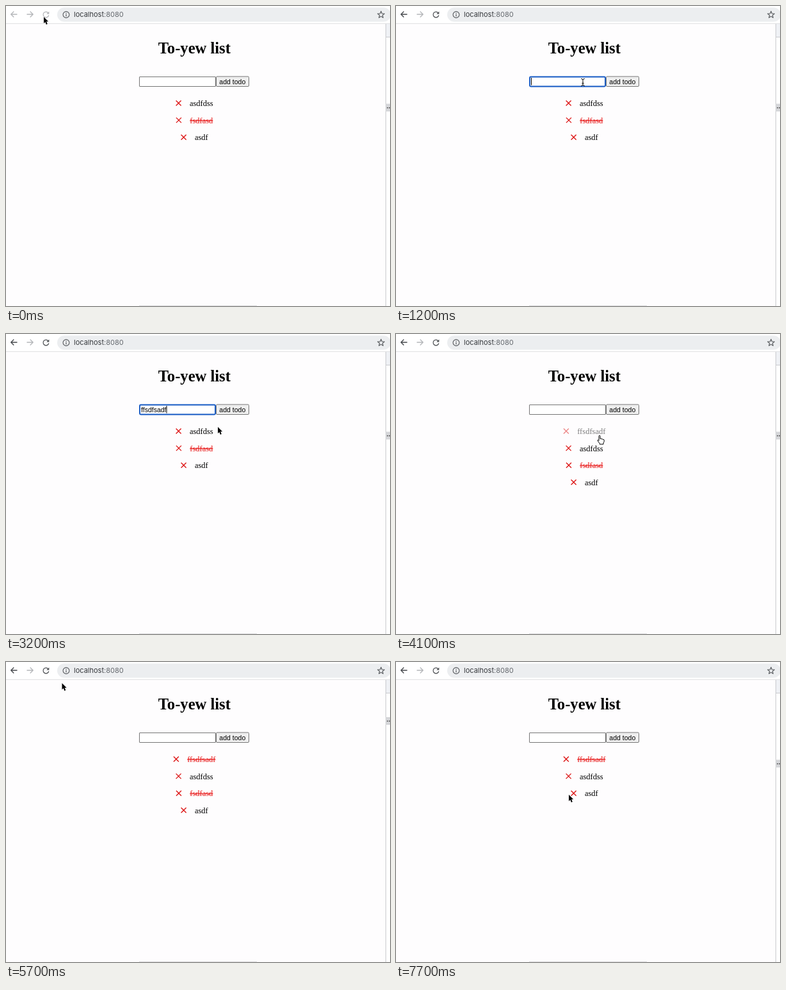
Recreate the animation shown at these times as an HTML page. Size 600 by 468 pixels, loop 8000 ms.

```html
<!DOCTYPE html>
<html lang="en">
<head>
<meta charset="utf-8">
<title>To-yew list</title>
<style>
  html, body { margin: 0; width: 100%; height: 100%; overflow: hidden; background: #fefdfe; }
  svg { display: block; width: 600px; height: 468px; }
  .line { fill: none; stroke-width: 1.3; }
  .title { font: bold 24.6px "Liberation Serif", serif; text-anchor: middle; }
  .item { font: 12.5px "Liberation Serif", serif; text-anchor: middle; }
  .done { fill: #e81818; text-decoration: line-through; }
  .control { font: 10.5px "Liberation Sans", sans-serif; }
  .address { font: 11px Inter, sans-serif; fill: #35383c; }
</style>
</head>
<body>
<svg viewBox="0 0 600 468">
  <rect width="600" height="468" fill="#fefdfe"/>

  <!-- browser toolbar -->
  <rect width="600" height="27" fill="#fff"/>
  <path d="M0 27.5H600" stroke="#e0e1e3"/>
  <rect x="80" y="2.5" width="521" height="22" rx="11" fill="#eceef0"/>
  <path id="back" class="line" d="M17.5 13H8M12.3 8.5L7.8 13L12.3 17.5"/>
  <path class="line" stroke="#b4b6b9" d="M32.5 13H42M37.7 8.5L42.2 13L37.7 17.5"/>
  <circle id="halo" cx="62.5" cy="13.5" r="11.3" fill="#e6e8eb"/>
  <g id="reload">
    <path class="line" d="M66 10.8A4.4 4.4 0 1 0 66.8 14.4"/>
    <path d="M67.4 8.4V12.6H63.2Z" stroke="none"/>
  </g>
  <circle class="line" cx="94" cy="13.5" r="4.9" stroke="#55585c" style="stroke-width:1.1"/>
  <path d="M94 12.8V16.2M94 10.7V11.9" stroke="#55585c" stroke-width="1.1"/>
  <text class="address" x="106" y="17.3">localhost<tspan fill="#65696e">:8080</tspan></text>
  <path id="star" class="line" stroke="#505357" stroke-linejoin="round" style="stroke-width:1.1"/>

  <!-- side panel edge -->
  <rect x="594" y="28" width="6" height="440" fill="#fff"/>
  <rect x="594" y="28" width="6" height="20" fill="#eff1f5"/>
  <path d="M593.5 28V468M594 48.5H600" stroke="#c9cace"/>
  <g id="handle">
    <rect x="593" y="-6" width="7" height="12" fill="#d5d6d9"/>
    <path d="M595.3 .3h1.6M598.3 .3h1.6" stroke="#444" stroke-width="1.5"/>
  </g>
  <path d="M208 467.5H392" stroke="#dedde0"/>

  <!-- page -->
  <text class="title" x="294.3" y="74">To-yew list</text>
  <rect id="field" fill="#fff"/>
  <text id="typed" class="control" x="211" y="121.5"></text>
  <path id="caret" stroke="#000"/>
  <rect id="button" x="328.5" y="110" width="51" height="15.5" rx="1.5" stroke="#767676"/>
  <text class="control" x="353.8" y="121.5" text-anchor="middle">add todo</text>
  <g id="list"></g>

  <!-- pointers, one shown at a time -->
  <g id="pointer">
    <path id="arrow" d="M0 0V10L2.3 8L3.9 11.9L5.8 11.1L4.2 7.3H7.2Z" stroke="#fff" stroke-width="1.2" paint-order="stroke"/>
    <g id="beam" fill="none">
      <path id="beamShape" stroke="#000" d="M-2.8-5.5Q-.4-5.5 0-4Q.4-5.5 2.8-5.5M0-4V4M-2.8 5.5Q-.4 5.5 0 4Q.4 5.5 2.8 5.5M-1.5 1.5H1.5"/>
    </g>
    <path id="hand" fill="#fff" stroke="#000" stroke-linejoin="round"
      d="M-1 1.4Q-1 .3 0 .3T1 1.4V5.5Q1.5 4.6 2.9 5.3L3.2 6Q4.4 5.2 5.2 6.5Q7.4 6 7.3 8.2Q7.3 10.5 6 12V14H.2V12.7L-2.8 8.7Q-3.4 7.3-2 7.4L-1 8.4Z"/>
  </g>
</svg>
<script>
const $ = id => document.getElementById(id);
const within = (t, from, to) => t >= from && t < to;
const show = (el, visible) => el.setAttribute('display', visible ? 'inline' : 'none');
const set = (el, attrs) => {
  for (const key in attrs) el.setAttribute(key, attrs[key]);
  return el;
};
const make = (tag, attrs, parent) =>
  parent.appendChild(set(document.createElementNS('http://www.w3.org/2000/svg', tag), attrs));

const LOOP = 8000, STEP = 100;
const ENTRY = 'ffsdfsadf';
const ADDED = 3800, STRUCK = 4400, REMOVED = 7300;

// pointer: time, x, y
const track = [
  [0, 59, 17], [200, 61, 14], [400, 68, 17], [600, 219, 80], [800, 275, 132],
  [1000, 292, 166], [1200, 292, 119], [2500, 292, 119], [2800, 302, 142],
  [3000, 316, 166], [3400, 346, 124], [3600, 351, 116], [3800, 351, 116],
  [4100, 318, 158], [4600, 318, 158], [4900, 275, 193], [5200, 82, 28],
  [5300, 62, 10], [5500, 60, 11], [5600, 60, 11], [5800, 115, 55],
  [6100, 235, 155], [6400, 275, 181], [6500, 275, 181], [6800, 266, 194],
  [6900, 266, 194], [7100, 271, 201], [7300, 271, 201], [7500, 250, 198], [7700, 270, 207]
];

// hovered item: from, to, label
const hovers = [
  [4000, 4700, ENTRY], [6400, 6700, 'asdfdss'], [7000, REMOVED, 'fsdfasd']
];

const items = [ENTRY, 'asdfdss', 'fsdfasd', 'asdf'].map(label => {
  const group = make('g', {}, $('list'));
  const text = make('text', { class: 'item', x: 305.3, y: 156 }, group);
  text.textContent = label;
  const x = 305.3 - text.getComputedTextLength() / 2 - 17.3;
  make('path', { d: `M${x - 4} 147.5l8 8m0-8l-8 8`, class: 'line', stroke: '#dc1010' }, group);
  return { label, group, text };
});

const starPoints = Array.from({ length: 10 }, (_, i) => {
  const angle = i * Math.PI / 5, radius = i % 2 ? 2.4 : 5.6;
  return [586 + radius * Math.sin(angle), 13.7 - radius * Math.cos(angle)];
});
$('star').setAttribute('d', 'M' + starPoints.join('L') + 'Z');

function pointerAt(t) {
  const next = track.findIndex(key => key[0] > t);
  if (next < 0) return track[track.length - 1].slice(1);
  const [t0, x0, y0] = track[next - 1], [t1, x1, y1] = track[next];
  const k = (t - t0) / (t1 - t0);
  return [x0 + (x1 - x0) * k, y0 + (y1 - y0) * k];
}

function drawToolbar(t) {
  $('back').setAttribute('stroke', t < 100 ? '#b4b6b9' : '#45484c');
  const reloadColor = t < 100 ? '#b4b6b9' : '#505357';
  set($('reload'), { stroke: reloadColor, fill: reloadColor });
  show($('halo'), within(t, 100, 900) || within(t, 5300, 5500));
  const raised = within(t, 400, 1100) || within(t, 5700, 6300);
  $('handle').setAttribute('transform', `translate(0 ${raised ? 92 : 158.5})`);
}

function drawForm(t) {
  const focused = within(t, 1200, 3700);
  set($('field'), focused
    ? { x: 209, y: 110.5, width: 118, height: 15, rx: 1.5, stroke: '#1559c4', 'stroke-width': 1.9 }
    : { x: 208.5, y: 110.5, width: 119, height: 15, rx: .5, stroke: '#767676', 'stroke-width': 1 });
  const count = within(t, 2100, ADDED) ? 1 + Math.floor(Math.max(0, t - 2200) * 8 / 600) : 0;
  const typed = $('typed');
  typed.textContent = ENTRY.slice(0, count);
  const end = 211.5 + (count ? typed.getComputedTextLength() : 0);
  $('caret').setAttribute('d', `M${end} 112V123.5`);
  show($('caret'), focused && !within(t, 1700, 2000) && !within(t, 3300, 3700));
  $('button').setAttribute('fill', within(t, 3700, 3800) ? '#dcdcdc' : '#efefef');
}

function drawList(t, hovered) {
  show($('list'), !within(t, 300, 400) && !within(t, 5600, 5700));
  let row = 0;
  for (const { label, group, text } of items) {
    const present = label === ENTRY ? t >= ADDED : label !== 'fsdfasd' || t < REMOVED;
    const done = label === 'fsdfasd' || (label === ENTRY && t >= STRUCK);
    show(group, present);
    text.classList.toggle('done', done);
    set(group, {
      transform: `translate(0 ${row * 26.6})`,
      opacity: label === hovered ? .5 : 1
    });
    if (present) row++;
  }
}

function drawPointer(t, hovered) {
  const shape = within(t, 1200, 2700) ? 'beam' : hovered ? 'hand' : 'arrow';
  for (const id of ['arrow', 'beam', 'hand']) show($(id), id === shape);
  const [x, y] = pointerAt(t);
  $('pointer').setAttribute('transform', `translate(${x} ${y})`);
}

function frame(now) {
  const t = Math.floor(now % LOOP / STEP) * STEP;
  const hover = hovers.find(([from, to]) => within(t, from, to));
  const hovered = hover && hover[2];
  drawToolbar(t);
  drawForm(t);
  drawList(t, hovered);
  drawPointer(t, hovered);
}

const start = performance.now();
function tick() {
  frame(performance.now() - start);
  requestAnimationFrame(tick);
}
tick();
</script>
</body>
</html>
```
